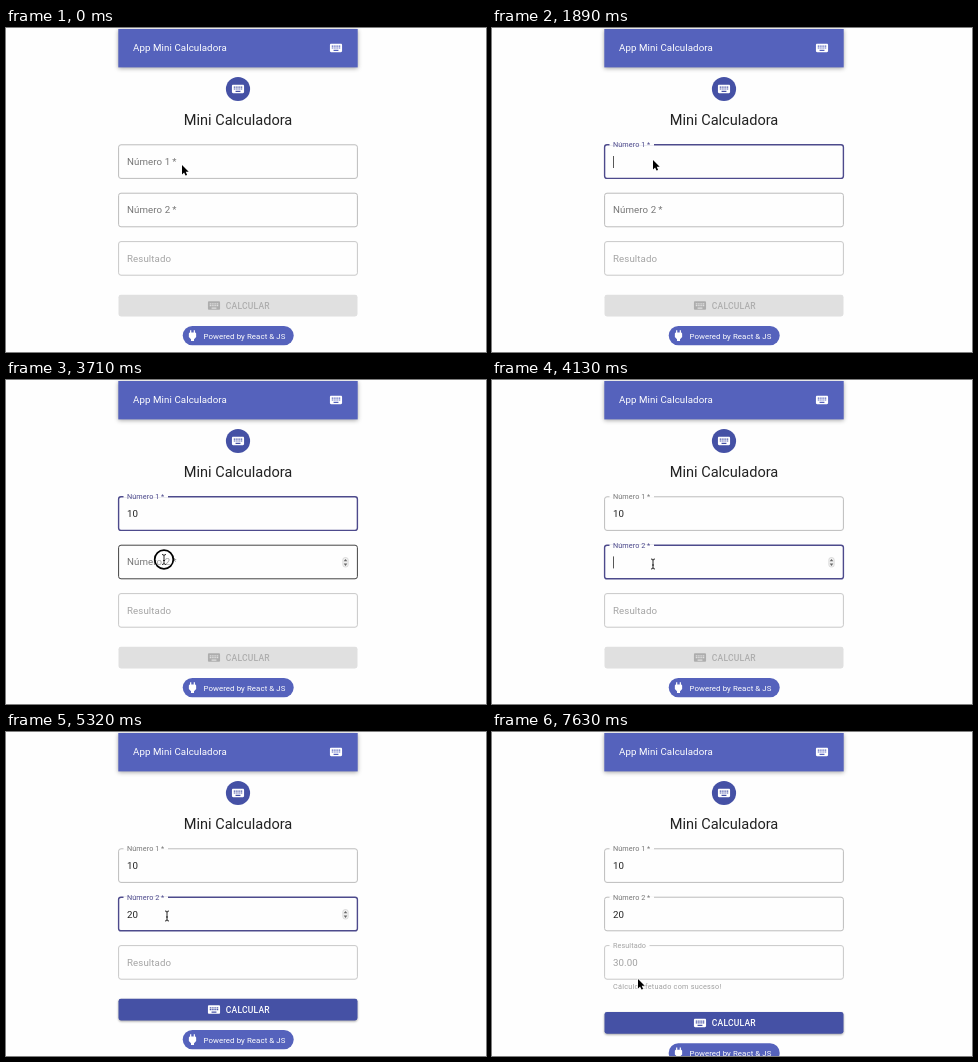
Recreate the animation shown at these times as an HTML page. Size 480 by 324 pixels, loop 8 s.

```html
<!DOCTYPE html>
<html lang="pt">
<head>
<meta charset="utf-8">
<title>Mini Calculadora</title>
<style>
  html, body { margin: 0; width: 100%; height: 100%; overflow: hidden; background: #fefefe; }
  svg { display: block; font: 9.71px Roboto, sans-serif; }
  .body { letter-spacing: .00938em; }
  .bar { filter: drop-shadow(0 1.5px 2px rgba(0,0,0,.36)); }
  .raised { filter: drop-shadow(0 1px 1.2px rgba(0,0,0,.36)); }
  .pressed { filter: drop-shadow(0 2.5px 2.5px rgba(0,0,0,.4)); }
</style>
</head>
<body>
<svg id="stage" width="480" height="324" viewBox="0 0 480 324"></svg>
<script>
const LOOP = 8000, STEP = 70;
const LIGHT = '#5562bc', MAIN = '#4551a5', FOCUS = '#4d4a8c', PAPER = '#fefefe';
const KEYBOARD = 'M20 5H4c-1.1 0-2 .9-2 2v10c0 1.1.9 2 2 2h16c1.1 0 2-.9 2-2V7c0-1.1-.9-2-2-2z' +
  [5, 8, 11, 14, 17].map(x => `M${x} 8v2h2V8zM${x} 11v2h2v-2z`).join('') + 'M8 15v2h8v-2z';
const PLUG = 'M16 7V3h-2v4h-4V3H8v4C7 7 6 8 6 9v5.5L9.5 18v3h5v-3l3.5-3.5V9c0-1-1-2-2-2z';
const ARROW = 'M0 0V9.4L2.1 7.4 3.5 10.6 5.1 9.9 3.7 6.8H6.7Z';
const BEAM = 'M-2-5Q0-5 0-3.8Q0-5 2-5M0-4V4M-2 5Q0 5 0 3.8Q0 5 2 5M-1 1H1';

// Pointer stops: time, x, y
const PATH = [
  [0, 176, 137], [70, 176, 137], [420, 166, 131], [1050, 166, 131], [1120, 161, 132],
  [3360, 161, 132], [3640, 158, 179.5], [3850, 158, 179.5], [3990, 161, 184],
  [5320, 161, 184], [6090, 218, 278], [6790, 218, 278], [7280, 127, 233],
  [7630, 146, 247], [LOOP, 146, 247]
];

const within = (t, a, b) => t >= a && t < b;
const progress = (t, start, length) => Math.min(1, Math.max(0, (t - start) / length));
const smooth = p => p * p * (3 - 2 * p);
const easeOut = p => 1 - (1 - p) ** 3;
const mix = (a, b, p) => a + (b - a) * p;
const mixRgb = (a, b, p) => `rgb(${a.map((v, i) => Math.round(mix(v, b[i], p)))})`;

function pointerAt(t) {
  const i = PATH.findIndex((stop, k) => k && t < stop[0]);
  const [t0, x0, y0] = PATH[i - 1], [t1, x1, y1] = PATH[i];
  const p = smooth(progress(t, t0, t1 - t0));
  return { x: mix(x0, x1, p), y: mix(y0, y1, p) };
}

const text = (x, y, words, fill, more = 'class="body"') =>
  `<text x="${x}" y="${y}" fill="${fill}" ${more}>${words}</text>`;

const icon = (d, x, y, fill) =>
  `<path d="${d}" fill="${fill}" fill-rule="evenodd" transform="translate(${x} ${y}) scale(.607) translate(-12 -12)"/>`;

const box = (x, y, w, h, r, more) =>
  `<rect x="${x}" y="${y}" width="${w}" height="${h}" rx="${r}" ${more}/>`;

function field({ top, label, notch, shrink, value = '', focused, hover, disabled, caret }) {
  const stroke = focused ? FOCUS : hover ? '#444' : disabled ? '#c8c8c8' : '#bcbcbc';
  const ink = focused ? FOCUS : disabled ? '#a4a4a4' : '#777';
  const caretX = 121.5 + value.length * 5.55;
  return box(112.6, top, 238.8, 33.6, 2.4, `fill="none" stroke="${stroke}" stroke-width="${focused ? 1.4 : 1}"`) +
    (shrink ? box(117.5, top - 1, notch * shrink, 2, 0, `fill="${PAPER}"`) : '') +
    `<g transform="translate(121 ${top + mix(20.2, 2.6, shrink)}) scale(${mix(1, .75, shrink)})">${text(0, 0, label, ink)}</g>` +
    text(121, top + 20.6, value, disabled ? '#a0a0a0' : '#222') +
    (caret ? box(caretX - .4, top + 11.2, .9, 12, 0, 'fill="#444"') : '') +
    (hover ? box(336.8, top + 12.4, 5.4, 9.4, 2.2, 'fill="#f1f1f1" stroke="#ccc" stroke-width=".6"') +
      `<path d="M337.7 ${top + 16}l1.8-2.3 1.8 2.3zm0 2.4l1.8 2.3 1.8-2.3z" fill="#666"/>` : '');
}

const suggestion = (y, words) =>
  box(112.5, y, 239, 31.6, 2.4, 'fill="#383c3f" class="raised"') +
  text(119.7, y + 19.2, words, '#fff', 'style="font:600 8px Inter,sans-serif"');

function button(t, y) {
  const on = smooth(progress(t, 4700, 250));
  const ink = t >= 4690 ? '#fff' : '#adadad';
  const fill = mixRgb([224, 224, 224], [69, 81, 165], on);
  const radius = 138 * smooth(progress(t, 6075, 300));
  const glow = .25 * (1 - progress(t, 6230, 420));
  const shadow = within(t, 6090, 6440) ? 'pressed' : on ? 'raised' : '';
  return box(112.5, y, 239, 21.6, 2.4, `fill="${fill}" class="${shadow}"`) +
    (within(t, 6090, 6720) ?
      `<clipPath id="face">${box(112.5, y, 239, 21.6, 2.4, '')}</clipPath>
       <circle cx="217.5" cy="${y + 11}" r="${radius}" fill="#fff" opacity="${glow}" clip-path="url(#face)"/>` : '') +
    icon(KEYBOARD, 208, y + 10.8, ink) +
    text(219.7, y + 13.9, 'CALCULAR', ink, 'font-size="8.5" font-weight="500" letter-spacing=".243"');
}

function pointer(t, { x, y }) {
  if (within(t, 2590, 3360) || within(t, 4620, 5320)) return '';
  const ring = within(t, 1610, 1680) || within(t, 3710, 3850) || within(t, 6090, 6160);
  const beam = within(t, 3360, 6090) && y < 199;
  return `<g transform="translate(${x} ${y})">` +
    (ring ? '<circle r="9.3" fill="#fff" fill-opacity=".3" stroke="#000" stroke-width="1.7"/>' : '') +
    (beam ? `<path d="${BEAM}" fill="none" stroke="#fff" stroke-width="1.8" opacity=".7"/>
             <path d="${BEAM}" fill="none" stroke="#111" stroke-width=".9"/>`
          : `<path d="${ARROW}" stroke="#fff" stroke-width="1.2" paint-order="stroke" stroke-linejoin="round"/>`) +
    '</g>';
}

function scene(t) {
  const spot = pointerAt(t);
  const over = top => within(t, 3361, 6090) && spot.y > top && spot.y < top + 34;
  const done = t >= 6230, drop = done ? 13.3 : 0;
  const first = t < 2870 ? '' : t < 3290 ? '1' : '10';
  const second = t < 4620 ? '' : t < 4970 ? '2' : '20';
  return box(112.3, 1, 239.4, 38.4, 0, `fill="${LIGHT}" class="bar"`) +
    text(127, 23.4, 'App Mini Calculadora', '#fff') +
    icon(KEYBOARD, 330, 20, '#fff') +
    `<circle cx="232" cy="61" r="12.1" fill="${MAIN}"/>` + icon(KEYBOARD, 232, 61, '#fff') +
    text(232, 97.4, 'Mini Calculadora', '#222', 'font-size="14.57" text-anchor="middle"') +
    field({
      top: 116.8, label: 'Número 1\u2009*', notch: 44.5, value: first,
      shrink: easeOut(progress(t, 1690, 200)),
      focused: within(t, 1680, 3850), hover: over(116.8),
      caret: within(t, 1750, 2240) || within(t, 2870, 3640)
    }) +
    field({
      top: 165.2, label: 'Número 2\u2009*', notch: 44.5, value: second,
      shrink: easeOut(progress(t, 3800, 200)),
      focused: within(t, 3850, 6090), hover: over(165.2),
      caret: within(t, 3850, 4340) || within(t, 4620, 5320) || within(t, 5810, 6090)
    }) +
    field({
      top: 213.6, label: 'Resultado', notch: 40, value: done ? '30.00' : '',
      shrink: easeOut(progress(t, 6230, 200)), disabled: true
    }) +
    (done ? text(121, 257, 'Cálculo efetuado com sucesso!', '#a0a0a0', 'font-size="7.28" letter-spacing=".243"') : '') +
    button(t, 266.8 + drop) +
    `<g transform="translate(0 ${drop})">` +
      box(176.7, 297.9, 111, 19.4, 9.7, `fill="${LIGHT}"`) + icon(PLUG, 186.5, 307.6, '#fff') +
      text(197.4, 310.5, 'Powered by React &amp; JS', '#fff', 'font-size="7.89" letter-spacing=".074"') +
    '</g>' +
    (within(t, 2940, 3290) ? suggestion(151, '10') : '') +
    (within(t, 4690, 4970) ? suggestion(199.3, '20') : '') +
    pointer(t, spot);
}

const stage = document.getElementById('stage');
const start = performance.now();
let shown = -1;
function tick() {
  const elapsed = (performance.now() - start) % LOOP;
  const t = Math.floor(elapsed / STEP) * STEP;
  if (t !== shown) stage.innerHTML = scene(shown = t);
  requestAnimationFrame(tick);
}
tick();
</script>
</body>
</html>
```
